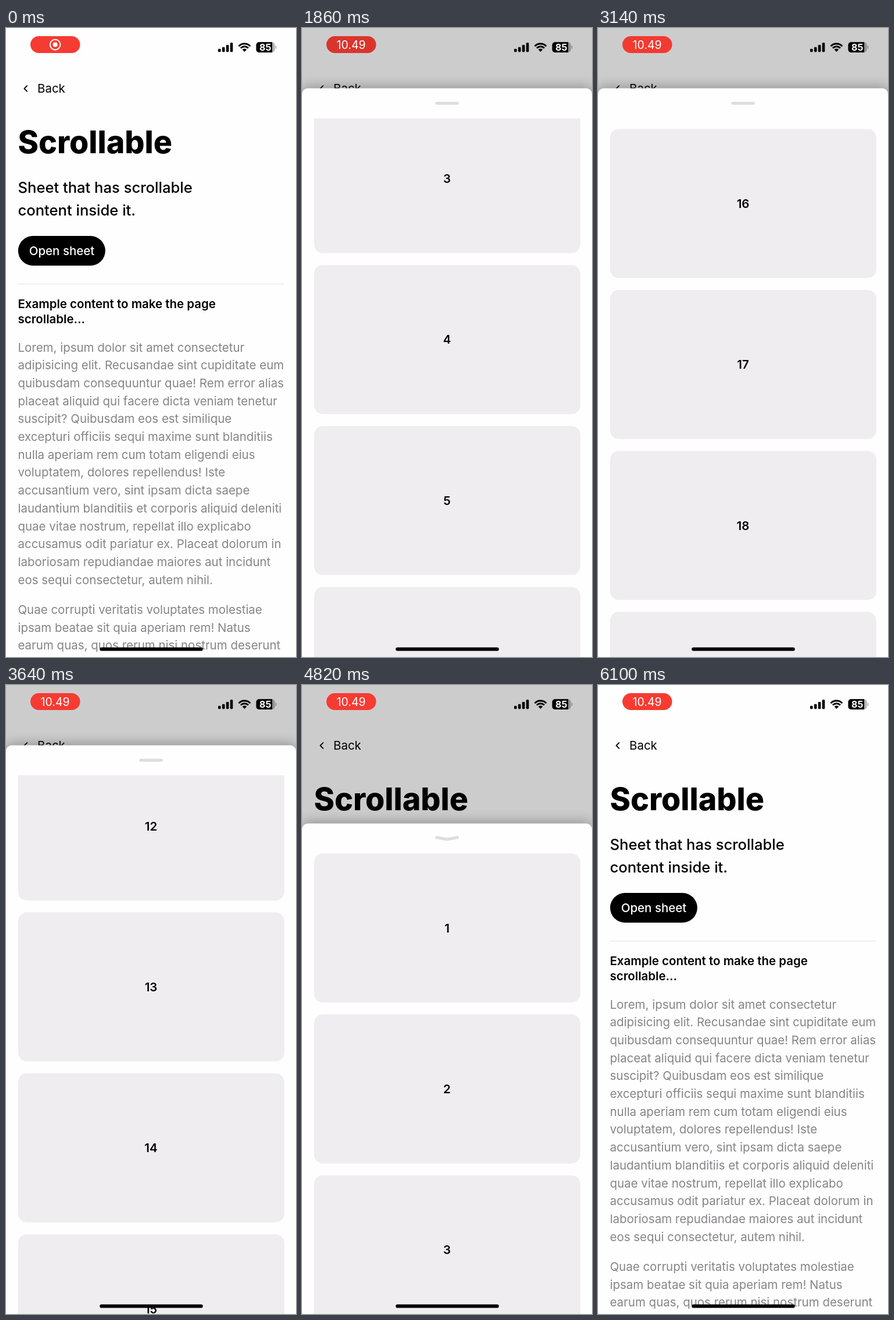
Recreate the animation shown at these times as an HTML page with a canvas. Size 499 by 1080 pixels, loop 6160 ms.

```html
<!DOCTYPE html>
<html lang="en">
<head>
<meta charset="utf-8">
<title>Scrollable sheet</title>
<style>
  html, body { margin: 0; width: 100%; height: 100%; overflow: hidden; background: #fefefe; }
  canvas { display: block; width: 499px; height: 1080px; }
</style>
</head>
<body>
<canvas id="stage"></canvas>
<script>
const W = 499, H = 1080, LOOP = 6160;
const U = W / 390;              // one layout pixel on the stage
const LEFT = 16 * U, RIGHT = W - LEFT;
const SHEET_TOP = 103.6, CLOSED = 1000;
const CARD_H = 200 * U, PITCH = 216 * U;
const PAPER = '#fefefe';

const canvas = document.getElementById('stage');
const ctx = canvas.getContext('2d');
const dpr = window.devicePixelRatio || 1;
canvas.width = W * dpr;
canvas.height = H * dpr;

const body = [
  'Lorem, ipsum dolor sit amet consectetur',
  'adipisicing elit. Recusandae sint cupiditate eum',
  'quibusdam consequuntur quae! Rem error alias',
  'placeat aliquid qui facere dicta veniam tenetur',
  'suscipit? Quibusdam eos est similique',
  'excepturi officiis sequi maxime sunt blanditiis',
  'nulla aperiam rem cum totam eligendi eius',
  'voluptatem, dolores repellendus! Iste',
  'accusantium vero, sint ipsam dicta saepe',
  'laudantium blanditiis et corporis aliquid deleniti',
  'quae vitae nostrum, repellat illo explicabo',
  'accusamus odit pariatur ex. Placeat dolorum in',
  'laboriosam repudiandae maiores aut incidunt',
  'eos sequi consectetur, autem nihil.'
];
const body2 = [
  'Quae corrupti veritatis voluptates molestiae',
  'ipsam beatae sit quia aperiam rem! Natus',
  'earum quas, quos rerum nisi nostrum deserunt'
];

// Motion keys: [time, value, speed per ms]
const scrollKeys = [
  [1430, 0, 0], [2500, 2407, 2.7], [3140, 4125.5, 1.6],
  [3290, 4250, 0], [4110, 530.3, -3.4], [4390, 0, 0]
];
const closeKeys = [
  [4570, 0, 0], [5210, 639.7, 1.4], [5500, CLOSED, 0.4]
];

const clamp = x => Math.min(1, Math.max(0, x));
const ramp = (t, a, b) => clamp((t - a) / (b - a));
const easeOut = p => 1 - (1 - p) ** 3;
const smooth = p => p * p * (3 - 2 * p);

// Cubic Hermite curve through the keys, constant outside them
function follow(keys, t) {
  if (t <= keys[0][0]) return keys[0][1];
  for (let i = 1; i < keys.length; i++) {
    const [t0, a, va] = keys[i - 1], [t1, b, vb] = keys[i];
    if (t > t1) continue;
    const d = t1 - t0, p = (t - t0) / d, q = 1 - p;
    return a * q * q * (1 + 2 * p) + va * d * p * q * q
         + b * p * p * (3 - 2 * p) - vb * d * p * p * q;
  }
  return keys[keys.length - 1][1];
}

function text(str, x, y, size, weight, color, align = 'left') {
  ctx.font = `${weight} ${size}px Inter, sans-serif`;
  ctx.textAlign = align;
  ctx.fillStyle = color;
  ctx.fillText(str, x, y);
}

function box(x, y, w, h, r, color) {
  ctx.fillStyle = color;
  ctx.beginPath();
  ctx.roundRect(x, y, w, h, r);
  ctx.fill();
}

function line(points, width, color, cap = 'round') {
  ctx.strokeStyle = color;
  ctx.lineWidth = width;
  ctx.lineCap = cap;
  ctx.lineJoin = 'round';
  ctx.beginPath();
  points.forEach(([x, y]) => ctx.lineTo(x, y));
  ctx.stroke();
}

function drawPage() {
  const size = 16 * U, step = 24 * U;
  ctx.fillStyle = PAPER;
  ctx.fillRect(0, 0, W, H);
  line([[36.3, 99.2], [31.4, 104], [36.3, 108.8]], 1.8, '#000');
  text('Back', 54, 111.4, size, 400, '#000');
  text('Scrollable', LEFT, 215.4, 42 * U, 800, '#000');
  text('Sheet that has scrollable', LEFT, 283.2, 20 * U, 500, '#000');
  text('content inside it.', LEFT, 321.6, 20 * U, 500, '#000');
  box(LEFT + .4, 357, 150, 51, 25.5, '#000');
  text('Open sheet', 96, 390.4, size, 500, '#fff', 'center');
  ctx.fillStyle = '#e8e6e9';
  ctx.fillRect(LEFT, 439, RIGHT - LEFT, 1.3);
  text('Example content to make the page', LEFT, 481.3, size, 600, '#000');
  text('scrollable…', LEFT, 506.9, size, 600, '#000');
  body.forEach((s, i) => text(s, LEFT, 555.5 + i * step, size, 400, '#868488'));
  body2.forEach((s, i) => text(s, LEFT, 1005.9 + i * step, size, 400, '#868488'));
}

function drawSheet(top, scroll, bend) {
  ctx.save();
  ctx.shadowColor = 'rgba(0,0,0,.3)';
  ctx.shadowBlur = 16 * U * dpr;
  ctx.shadowOffsetY = -2 * U * dpr;
  box(0, top, W, H + 60, [10, 10, 0, 0], PAPER);
  ctx.restore();

  const mid = top + 25.6, dip = bend * 1.6;
  line([[231.8, mid - dip], [249.5, mid + dip], [267.2, mid - dip]], 5.1, '#dddcde');

  const area = top + 51.4;
  ctx.save();
  ctx.beginPath();
  ctx.rect(0, area, W, H);
  ctx.clip();
  const first = Math.max(0, Math.floor(scroll / PITCH));
  for (let i = first; area + i * PITCH - scroll < H; i++) {
    const y = area + i * PITCH - scroll;
    box(LEFT + .3, y, RIGHT - LEFT, CARD_H, 15, '#efedf0');
    text(i + 1, W / 2, y + CARD_H / 2 + 7.5, 16 * U, 600, '#000', 'center');
  }
  ctx.restore();
}

function drawPill(t) {
  const dim = Math.exp(-(((t - 2100) / 700) ** 2)) * 32;
  box(42, 14, 85.5, 29, 14.5, `rgb(${246 - dim},${59 - dim / 5},${50 - dim / 6})`);
  const swap = smooth(ramp(t, 750, 1050));
  ctx.globalAlpha = 1 - swap;
  ctx.strokeStyle = ctx.fillStyle = '#fff';
  ctx.lineWidth = 2;
  ctx.beginPath();
  ctx.arc(84.6, 28.6, 8.8, 0, 7);
  ctx.stroke();
  ctx.beginPath();
  ctx.arc(84.6, 28.6, 4, 0, 7);
  ctx.fill();
  ctx.globalAlpha = swap;
  text('10.49', 84.6, 35.8, 19.5, 400, '#fff', 'center');
  ctx.globalAlpha = 1;
}

function drawStatus(t) {
  drawPill(t);
  [5.5, 8.5, 12.3, 16].forEach((h, i) => box(365 + i * 6.9, 41.2 - h, 4.6, h, 1.4, '#000'));

  // Wi-Fi fan
  ctx.strokeStyle = ctx.fillStyle = '#000';
  ctx.lineWidth = 2.9;
  ctx.lineCap = 'butt';
  for (const r of [13.6, 8.9]) {
    ctx.beginPath();
    ctx.arc(410.4, 40.6, r, -Math.PI * .76, -Math.PI * .24);
    ctx.stroke();
  }
  ctx.beginPath();
  ctx.moveTo(410.4, 41);
  ctx.arc(410.4, 40.6, 5.2, -Math.PI * .76, -Math.PI * .24);
  ctx.fill();

  // Battery
  ctx.save();
  ctx.beginPath();
  ctx.roundRect(430.5, 24.3, 32, 17.6, 5);
  ctx.clip();
  ctx.fillStyle = 'rgba(0,0,0,.3)';
  ctx.fillRect(430, 24, 33, 18);
  ctx.fillStyle = '#000';
  ctx.fillRect(430, 24, 28, 18);
  ctx.restore();
  box(463.6, 30.2, 1.6, 5.8, [0, 1.6, 1.6, 0], 'rgba(0,0,0,.35)');
  text('85', 446.3, 38.9, 16, 700, '#fff', 'center');
}

function draw(t) {
  ctx.setTransform(dpr, 0, 0, dpr, 0, 0);
  const opening = easeOut(ramp(t, 80, 600));
  const shift = (1 - opening) * CLOSED + follow(closeKeys, t);
  const shade = smooth(ramp(t, 80, 420)) * (1 - smooth(ramp(t, 5225, 5560)));
  const bend = smooth(ramp(t, 4600, 4740)) * (1 - ramp(t, 5240, 5360));

  drawPage();
  ctx.fillStyle = `rgba(10,0,10,${.195 * shade})`;
  ctx.fillRect(0, 0, W, H);
  if (shift < CLOSED) drawSheet(SHEET_TOP + shift, follow(scrollKeys, t), bend);
  drawStatus(t);
  box(161.2, 1063.4, 177.6, 6.2, 3.1, '#000');
}

const start = performance.now();
function tick() {
  draw((performance.now() - start) % LOOP);
  requestAnimationFrame(tick);
}
tick();
</script>
</body>
</html>
```
